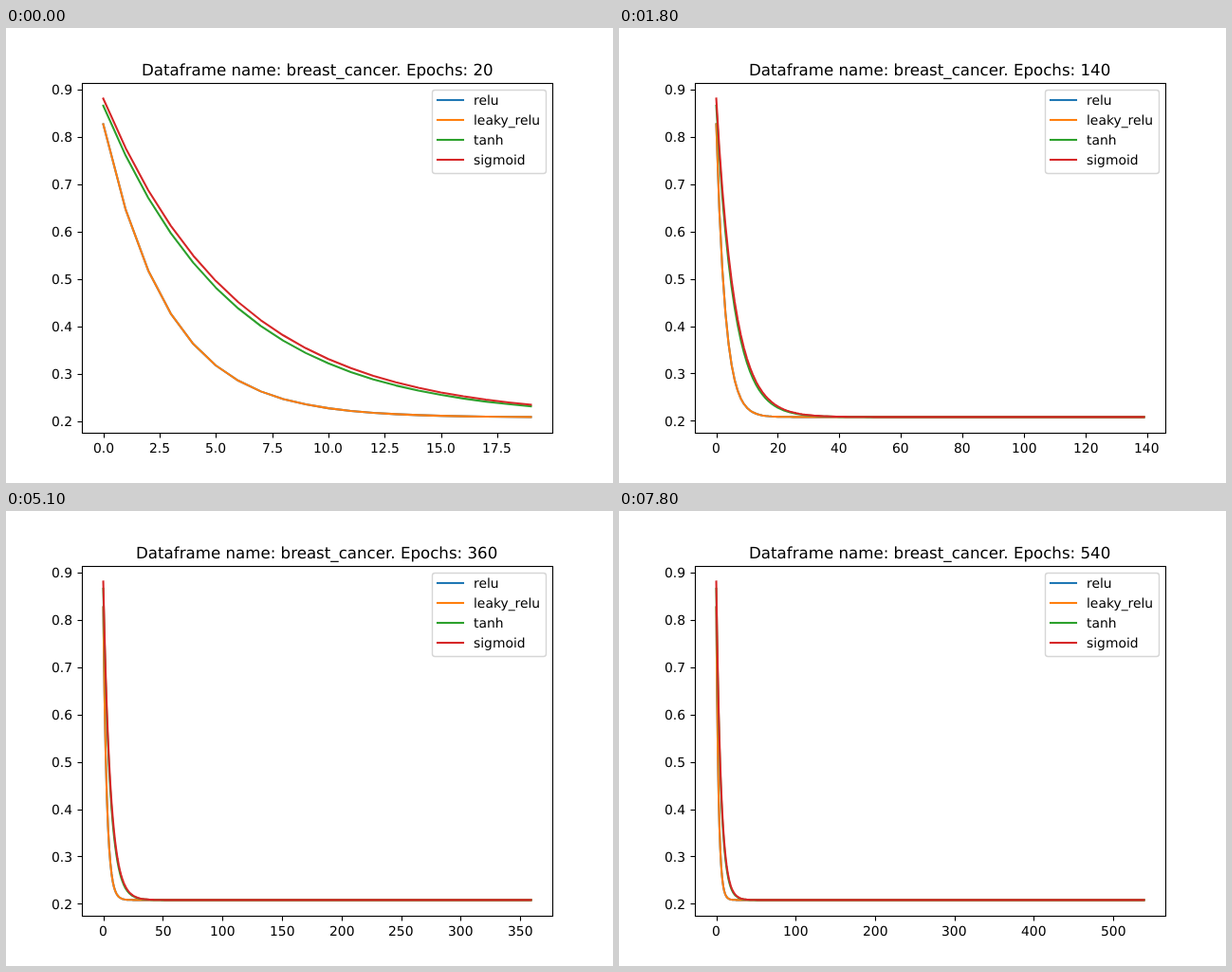
Write an HTML page with a canvas that moves like this. It is 640x480 px and loops after 8000 ms.

```html
<!DOCTYPE html>
<html lang="en">
<head>
<meta charset="utf-8">
<title>Loss by activation</title>
<style>
  html, body { margin: 0; width: 100%; height: 100%; overflow: hidden; background: #fff; }
  canvas { display: block; }
</style>
</head>
<body>
<canvas id="chart" width="640" height="480"></canvas>
<script>
const ctx = document.getElementById('chart').getContext('2d');
const LOOP = 8000, STEP = 300, EPOCH_STEP = 20;
const PT = 100 / 72;
const AXES = { left: 80, right: 576, top: 57.6, bottom: 427.2 };
const FLOOR = 0.208;

// Each loss decays exponentially towards FLOOR.
const series = [
  { name: 'relu', color: '#1f77b4', start: 0.827, rate: 0.346 },
  { name: 'leaky_relu', color: '#ff7f0e', start: 0.827, rate: 0.346 },
  { name: 'tanh', color: '#2ca02c', start: 0.866, rate: 0.1752 },
  { name: 'sigmoid', color: '#d62728', start: 0.8812, rate: 0.1697 }
];

const loss = (s, epoch) => FLOOR + (s.start - FLOOR) * Math.exp(-s.rate * epoch);
const snap = v => Math.round(v) + 0.5;

function line(x1, y1, x2, y2) {
  ctx.beginPath();
  ctx.moveTo(x1, y1);
  ctx.lineTo(x2, y2);
  ctx.stroke();
}

// align: 0 = left, 0.5 = centre, 1 = right
function text(str, x, y, size, align) {
  ctx.font = `${size * PT}px "DejaVu Sans", sans-serif`;
  ctx.fillStyle = '#000';
  ctx.fillText(str, Math.round(x - ctx.measureText(str).width * align), y);
}

function tickStep(span) {
  const raw = span / 9;
  const unit = 10 ** Math.floor(Math.log10(raw));
  return unit * [1, 2, 2.5, 5, 10].find(m => m * unit >= raw);
}

function drawCurves(epochs, toX, toY) {
  ctx.lineWidth = 1.5 * PT;
  ctx.lineJoin = 'round';
  ctx.lineCap = 'square';
  for (const s of series) {
    ctx.strokeStyle = s.color;
    ctx.beginPath();
    for (let i = 0; i < epochs; i++) ctx.lineTo(toX(i), toY(loss(s, i)));
    ctx.stroke();
  }
}

function drawAxes(epochs, toX, toY) {
  const last = epochs - 1;
  const left = snap(AXES.left), bottom = snap(AXES.bottom), top = snap(AXES.top);
  ctx.strokeStyle = '#000';
  ctx.lineWidth = 0.8 * PT;
  ctx.lineCap = 'butt';
  ctx.lineJoin = 'miter';

  const step = tickStep(1.1 * last);
  const digits = step % 1 ? 1 : 0;
  for (let v = 0; v <= 1.05 * last; v += step) {
    const x = toX(v);
    line(snap(x), bottom, snap(x), bottom + 5);
    text(v.toFixed(digits), x, 448, 10, 0.5);
  }
  for (let n = 2; n <= 9; n++) {
    const y = toY(n / 10);
    line(left - 5, snap(y), left, snap(y));
    text((n / 10).toFixed(1), AXES.left - 7 * PT, Math.round(y + 5.4), 10, 1);
  }
  ctx.strokeRect(left, top, snap(AXES.right) - left, bottom - top);
}

function drawLegend() {
  ctx.beginPath();
  ctx.roundRect(449.5, 65.5, 120, 88, 2.78);
  ctx.strokeStyle = '#d6d6d6';
  ctx.lineWidth = PT;
  ctx.stroke();

  ctx.lineWidth = 1.5 * PT;
  ctx.lineCap = 'square';
  series.forEach((s, i) => {
    const y = 76 + 21 * i;
    ctx.strokeStyle = s.color;
    line(455, y, 482, y);
    text(s.name, 493, y + 5, 10, 0);
  });
}

function draw(epochs) {
  const last = epochs - 1;
  const max = Math.max(...series.map(s => s.start));
  const min = Math.min(...series.map(s => loss(s, last)));
  const width = AXES.right - AXES.left, height = AXES.bottom - AXES.top;
  const toX = v => AXES.left + width * (v / last + 0.05) / 1.1;
  const toY = v => AXES.top + height * ((max - v) / (max - min) + 0.05) / 1.1;

  ctx.fillStyle = '#fff';
  ctx.fillRect(0, 0, 640, 480);
  ctx.textRendering = 'geometricPrecision';
  drawCurves(epochs, toX, toY);
  drawAxes(epochs, toX, toY);
  text(`Dataframe name: breast_cancer. Epochs: ${epochs}`, 328, 49.5, 12, 0.5);
  drawLegend();
}

const begin = performance.now();
let shown = 0;

function frame() {
  const time = (performance.now() - begin) % LOOP;
  const epochs = EPOCH_STEP * (1 + Math.floor(time / STEP));
  if (epochs !== shown) draw(shown = epochs);
  requestAnimationFrame(frame);
}
frame();
</script>
</body>
</html>
```
